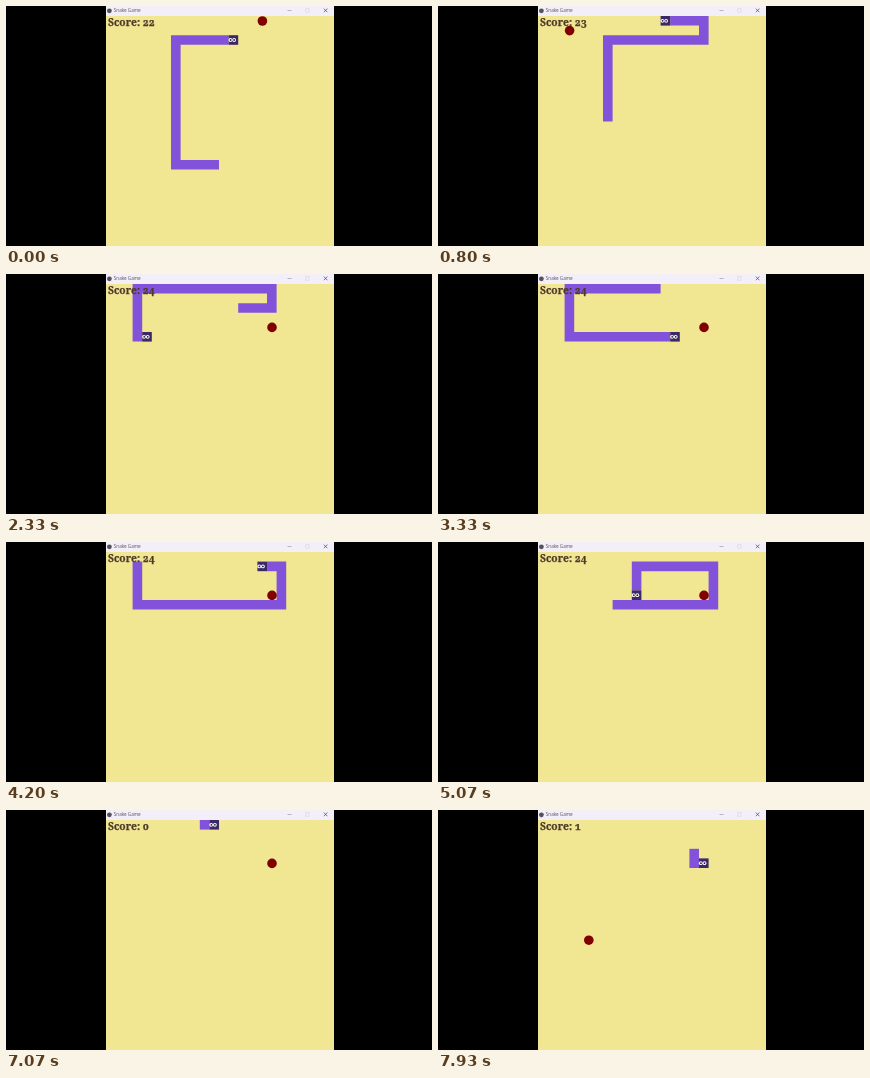
These frames come from a looping animation (426 by 240 pixels, 8 s). An HTML page:

```html
<!DOCTYPE html>
<html lang="en">
<head>
<meta charset="utf-8">
<title>Snake Game</title>
<style>
  html, body { margin: 0; width: 100%; height: 100%; overflow: hidden; background: #000; }
  svg { display: block; width: 100%; height: 100%; }
  #score {
    font: bold 10.3px "Noto Serif", serif;
    font-variant-numeric: oldstyle-nums;
    fill: #4d3a2a;
    stroke: #4d3a2a;
    stroke-width: .25;
  }
  #title { font: 4.6px "Open Sans", sans-serif; fill: #55505c; }
  .button { fill: none; stroke-width: .7; }
</style>
</head>
<body>
<svg viewBox="0 0 426 240">
  <clipPath id="window"><rect x="100" width="228" height="240"/></clipPath>
  <rect width="426" height="240"/>
  <g clip-path="url(#window)">
    <rect x="100" width="228" height="240" fill="#f1e793"/>
    <path id="body" fill="none" stroke="#8253da" stroke-width="9.6" stroke-linecap="square" stroke-linejoin="miter"/>
    <g id="head">
      <rect width="9.6" height="9.6" fill="#3d2867"/>
      <g fill="#fff"><circle cx="1.8" cy="4.8" r="1.9"/><circle cx="5.5" cy="4.8" r="1.9"/></g>
      <g fill="#24183c"><circle cx="2" cy="4.8" r=".9"/><circle cx="5.5" cy="4.8" r=".9"/></g>
    </g>
    <circle id="food" r="4.8" fill="#800000"/>
    <text id="score" x="101.9" y="20"></text>
    <rect x="100" width="228" height="10" fill="#f3eff8"/>
    <circle cx="103.4" cy="4.8" r="2.4" fill="#55505c"/>
    <text id="title" x="107.8" y="6.3">Snake Game</text>
    <path class="button" stroke="#a09ba8" d="M281.5 4.5h4"/>
    <path class="button" stroke="#dcd7e2" d="M299.5 2.7h3.5v3.5h-3.5z"/>
    <path class="button" stroke="#45404c" d="M317.8 2.6l3.6 3.6m0-3.6l-3.6 3.6"/>
  </g>
</svg>
<script>
const CELL = 9.6, LEFT = 97.8, TOP = 10;
const LOOP = 8000, FRAMES = 120;
const DIRECTIONS = { L: [-1, 0], R: [1, 0], U: [0, -1], D: [0, 1] };
const byId = id => document.getElementById(id);
const [body, head, food, score] = ['body', 'head', 'food', 'score'].map(byId);

// Expands turns such as "R4 U2" into the list of visited cells.
function trail(start, moves) {
  const cells = [start];
  for (const [, way, count] of moves.matchAll(/([LRUD])(\d+)/g)) {
    const [dx, dy] = DIRECTIONS[way];
    for (let i = 0; i < count; i++) {
      const [x, y] = cells[cells.length - 1];
      cells.push([x + dx, y + dy]);
    }
  }
  return cells;
}

// pace: [frame, steps taken]; foods: cell and the step at which it is eaten.
const rounds = [
  {
    from: 0, score: 22, length: 24,
    cells: trail([11, 15], 'L4 U13 R6 R4 U2 L14 D5 R15 U4 L8 D3'),
    pace: [[0, .9], [12, 10.1], [35, 26.5], [50, 36.6], [76, 55.4]],
    foods: [[16, 0, 7], [3, 1, 21], [17, 4, Infinity]]
  },
  {
    from: 92, score: 0, length: 2,
    cells: trail([0, 0], 'R16 D4 R1'),
    pace: [[92, .37], [93, 1.1], [119, 20.1]],
    foods: [[17, 4, 20], [5, 12, Infinity]]
  }
];

function stepsAt(pace, frame) {
  const next = pace.findIndex(([f]) => f > frame);
  if (next < 0) return Math.floor(pace[pace.length - 1][1]);
  const [f0, s0] = pace[next - 1], [f1, s1] = pace[next];
  return Math.floor(s0 + (s1 - s0) * (frame - f0) / (f1 - f0));
}

const px = c => LEFT + c * CELL;
const py = r => TOP + r * CELL;
const center = ([c, r]) => `${px(c + .5)} ${py(r + .5)}`;

function draw(time) {
  const frame = Math.floor(((time + 4) % LOOP) * FRAMES / LOOP);
  const round = frame < rounds[1].from ? rounds[0] : rounds[1];
  const steps = stepsAt(round.pace, frame);
  const eaten = round.foods.filter(f => f[2] <= steps).length;
  const tip = round.length - 1 + steps;
  const snake = round.cells.slice(tip + 1 - round.length - eaten, tip + 1);
  const [hx, hy] = snake.pop();
  const [fx, fy] = round.foods[eaten];
  // A lone cell repeats its point so that the square cap shows.
  body.setAttribute('d', 'M' + [snake[0], ...snake].map(center).join('L'));
  head.setAttribute('transform', `translate(${px(hx)} ${py(hy)})`);
  food.setAttribute('cx', px(fx + .5) + .2);
  food.setAttribute('cy', py(fy + .5) + .2);
  score.textContent = `Score: ${round.score + eaten}`;
}

function tick() {
  draw(performance.now());
  requestAnimationFrame(tick);
}
tick();
</script>
</body>
</html>
```
